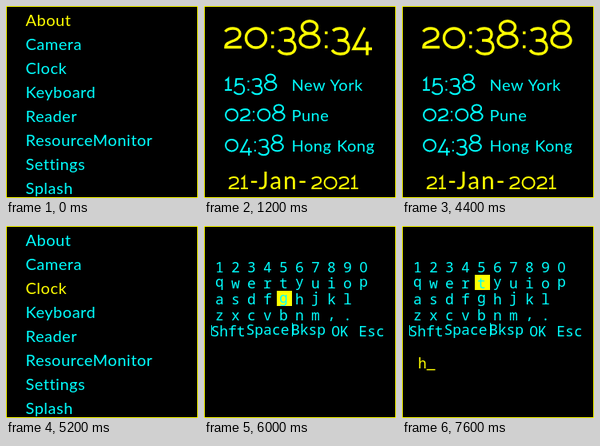
An HTML page that plays this animation: 240 px wide and 240 px high, repeating every 8 s.

```html
<!DOCTYPE html>
<html lang="en">
<head>
<meta charset="utf-8">
<title>Menu, clock and keyboard</title>
<style>
  html, body { margin: 0; width: 100%; height: 100%; overflow: hidden; background: #000; }
  svg { display: block; width: 100%; height: 100%; }
  text { fill: #0ff; font: 20px Lato, sans-serif; letter-spacing: .5px; word-spacing: 1px; white-space: pre; }
  .key { font: 18px "Noto Sans Mono", "DejaVu Sans Mono", monospace; letter-spacing: 0; text-anchor: middle; }
  .plain { font-family: "Noto Sans", sans-serif; }
  .typed { text-anchor: start; }
  .date { font-size: 30px; letter-spacing: 1.8px; }
  .on, .date, .typed { fill: #ff0; }
</style>
</head>
<body>
<svg id="stage" viewBox="0 0 240 240"></svg>
<script>
const LOOP = 8000;
const CYAN = '#0ff', YELLOW = '#ff0';
const stage = document.getElementById('stage');

function add(parent, tag, attrs = {}, content = '') {
  const node = document.createElementNS('http://www.w3.org/2000/svg', tag);
  for (const name in attrs) node.setAttribute(name, attrs[name]);
  node.textContent = content;
  parent.append(node);
  return node;
}

const label = (parent, x, y, content, style = '') =>
  add(parent, 'text', { x, y, class: style }, content);

// Old-style numerals on a 100-unit em: [advance, stroke path]
const NUMERALS = {
  0: [64, 'M7-26a25 24 0 1 0 50 0a25 24 0 1 0-50 0z'],
  1: [37, 'M5-43Q13-44 18-51V-3M4-3H33'],
  2: [50, 'M5-42Q11-50 24-50C37-50 42-43 42-36C42-28 37-24 28-20C14-15 6-12 6-3H46'],
  3: [52, 'M6-44Q13-50 24-50C37-50 42-43 42-35C42-26 36-20 26-20H18M26-20C40-20 46-12 46-3C46 8 38 14 25 14Q11 14 4 4'],
  4: [56, 'M34-52L6 1H52M40-17V17'],
  5: [55, 'M43-49H14L11-22Q18-28 27-28C40-28 47-18 47-7C47 6 38 14 26 14Q12 14 5 3'],
  6: [59, 'M49-60Q42-68 32-68C16-68 7-54 7-32C7-12 16-2 31-2C45-2 54-12 54-23C54-36 44-45 31-45C17-45 8-35 7-25'],
  7: [48, 'M4-49H43L16 17'],
  8: [62, 'M11-53a19 15.5 0 1 0 38 0a19 15.5 0 1 0-38 0zM6-20a24 17.5 0 1 0 48 0a24 17.5 0 1 0-48 0z'],
  ':': [20, 'M6-4h7M6-39h7']
};

function numerals(parent, x, y, size, content, color) {
  const group = add(parent, 'g', {
    role: 'img', 'aria-label': content, fill: 'none', stroke: color, 'stroke-width': 6.8,
    transform: `translate(${x} ${y}) scale(${size / 100})`
  });
  let pen = 0;
  for (const char of content) {
    const [advance, d] = NUMERALS[char];
    add(group, 'path', { d, transform: `translate(${pen})` });
    pen += advance;
  }
  return group;
}

add(stage, 'rect', { width: 240, height: 240 });
const menu = add(stage, 'g');
const clock = add(stage, 'g');
const keyboard = add(stage, 'g');
add(stage, 'rect', { x: .5, y: .5, width: 239, height: 239, fill: 'none', stroke: YELLOW });

const items = ['About', 'Camera', 'Clock', 'Keyboard', 'Reader', 'ResourceMonitor', 'Settings', 'Splash']
  .map((name, i) => label(menu, 24.5, 25 + 30 * i, name));

[['15:38', 'New York'], ['02:08', 'Pune'], ['04:38', 'Hong Kong']].forEach(([time, city], i) => {
  const y = 106 + 38 * i;
  numerals(clock, 25, y, 30, time, CYAN);
  label(clock, 109.5, y, city);
});
numerals(clock, 30, 229, 30, '21', YELLOW);
label(clock, 57, 229, '-Jan-', 'date');
numerals(clock, 133.5, 229, 30, '2021', YELLOW);
const seconds = Array.from({ length: 5 }, (_, i) =>
  numerals(clock, 24, 53, 50, `20:38:${34 + i}`, YELLOW));

const cursor = add(keyboard, 'rect', { width: 19, height: 19, fill: YELLOW });

// Keys are centred on their ink, so descenders lift the baseline
function key(x, y, name) {
  const lift = /[gjpqy,]/.test(name) ? 2 : 0;
  label(keyboard, x, y - lift, name, name === '0' ? 'key plain' : 'key');
}
['1234567890', 'qwertyuiop', 'asdfghjkl', 'zxcvbnm,.'].forEach((row, r) =>
  [...row].forEach((char, c) => key(19.5 + 20 * c, 58 + 20 * r, char)));
[['Shft', 30], ['Space', 79.5], ['Bksp', 130.5], ['OK', 170], ['Esc', 209.5]]
  .forEach(([name, x]) => key(x, 138, name));
add(keyboard, 'path', { d: 'M9.5 124V137M110.5 121V138', stroke: CYAN });
const typed = label(keyboard, 20, 178, 'h_', 'key typed');

// [start, column, row] of the highlighted key
const moves = [[6000, 4, 2], [6400, 5, 2], [7200, 5, 1], [7600, 4, 1]];

const show = (node, visible) => node.setAttribute('display', visible ? 'inline' : 'none');

function render(t) {
  const inClock = t >= 1200 && t < 5200;
  const inKeyboard = t >= 6000;
  show(menu, !inClock && !inKeyboard);
  show(clock, inClock);
  show(keyboard, inKeyboard);

  const selected = t < 1200 ? Math.floor(t / 400) : t < 5600 ? 2 : 3;
  items.forEach((item, i) => item.classList.toggle('on', i === selected));

  const tick = Math.floor((t - 1200) / 800);
  seconds.forEach((node, i) => show(node, i === tick));

  const [, column, row] = moves.filter(([start]) => start <= t).pop() || moves[0];
  cursor.setAttribute('x', 11 + 20 * column);
  cursor.setAttribute('y', 41 + 20 * row);
  show(typed, t >= 6800);
}

let origin;
function frame(now) {
  origin ??= now;
  render((now - origin) % LOOP);
  requestAnimationFrame(frame);
}
render(0);
requestAnimationFrame(frame);
</script>
</body>
</html>
```
